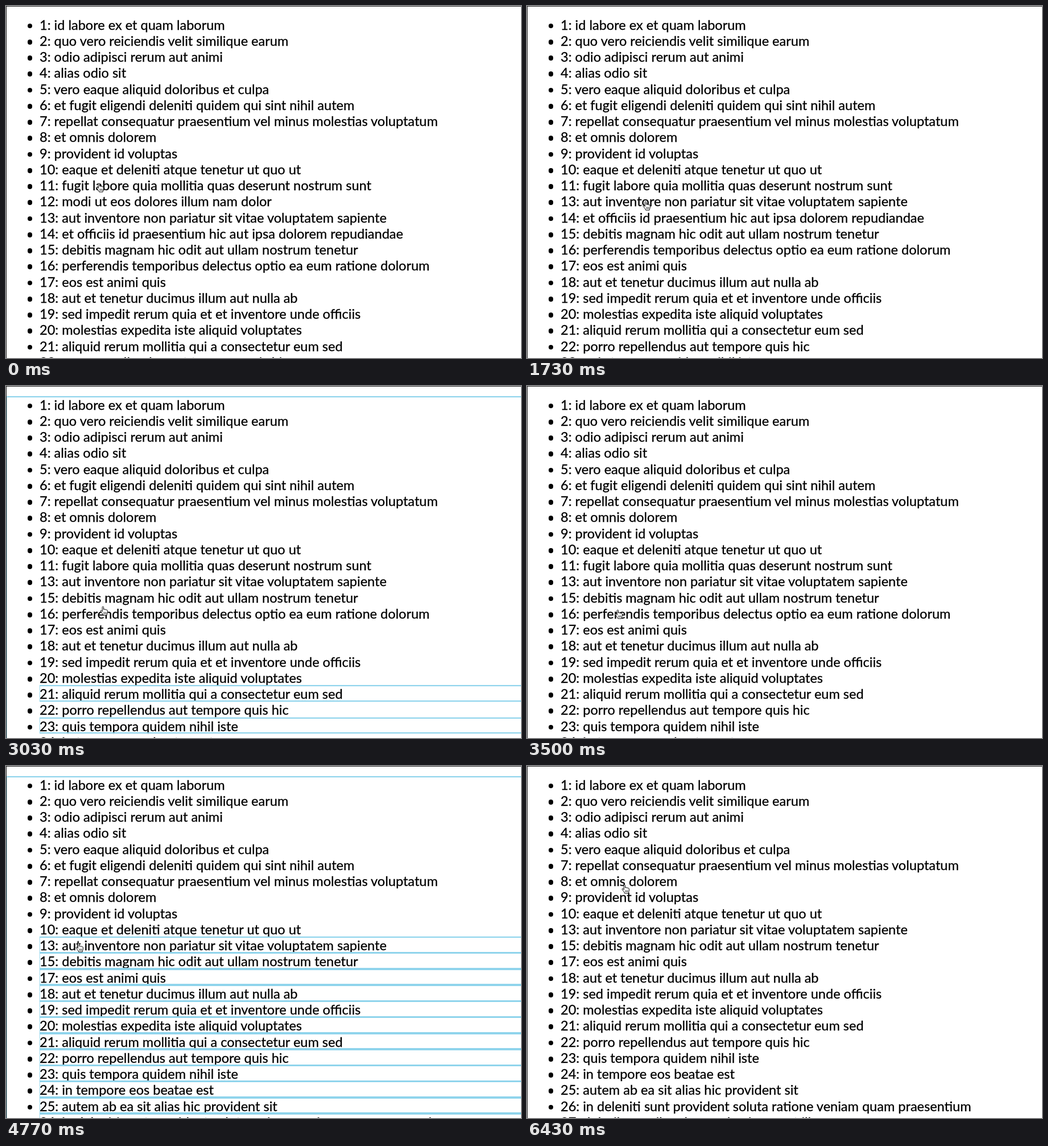
Recreate the animation shown at these times as an HTML page. Size 905x619 px, loop 8170 ms.

```html
<!DOCTYPE html>
<html lang="la">
<head>
<meta charset="utf-8">
<title>List</title>
<style>
  html, body { margin: 0; width: 100%; height: 100%; overflow: hidden; background: #fff; }
  #stage { position: relative; width: 905px; height: 619px; overflow: hidden; }
  #stage::after {
    content: ""; position: absolute; inset: 0;
    border: solid #1c1c1c; border-width: 1px 0 0 1px;
  }
  ul {
    position: absolute; left: 1px; top: 18.5px; width: 930px;
    margin: 0; padding: 0 0 0 58px; box-sizing: border-box; list-style: none;
    font: 400 23.54px/28.25px Lato, sans-serif; color: #000;
    -webkit-text-stroke: .3px #000;
  }
  li { position: relative; height: 28.25px; white-space: nowrap; }
  li::before {
    content: ""; position: absolute; left: -21.5px; top: 12.2px;
    width: 8.6px; height: 8.6px; border-radius: 50%; background: #000;
  }
  .lit::after {
    content: ""; position: absolute; inset: -.8px 0 .4px 0;
    border: 2px solid #8fd4ec; border-left: 1.5px solid #abdff1;
    box-shadow: 0 0 1px #8fd4ec;
  }
  li[hidden] { display: none; }
  #hand { position: absolute; left: 0; top: 0; width: 15px; height: 17px; }
</style>
</head>
<body>
<div id="stage">
  <ul id="list"></ul>
  <svg id="hand" viewBox="0 0 15 17">
    <path d="M4.2 9.6V2.2c0-2 2.4-2 2.4 0v4c.3-1.2 2.2-1 2.3.3.5-1 2.2-.7 2.3.6.7-.8 2.2-.4 2.2 1v3c0 1.600-1.200 2.400-1.200 4.900H5.700c0-1.500-1.600-2.700-2.500-4.300L1.300 9.200c-.8-1.400.9-2.300 1.800-1z"
      fill="#fff" stroke="#000" stroke-width="1" stroke-linejoin="round"/>
    <path d="M7 10.500v3.500M9 10.500v3.500M11 10.500v3.500" stroke="#000" stroke-width=".8"/>
  </svg>
</div>
<script>
  const LOOP = 8170;
  const titles = [
    'id labore ex et quam laborum',
    'quo vero reiciendis velit similique earum',
    'odio adipisci rerum aut animi',
    'alias odio sit',
    'vero eaque aliquid doloribus et culpa',
    'et fugit eligendi deleniti quidem qui sint nihil autem',
    'repellat consequatur praesentium vel minus molestias voluptatum',
    'et omnis dolorem',
    'provident id voluptas',
    'eaque et deleniti atque tenetur ut quo ut',
    'fugit labore quia mollitia quas deserunt nostrum sunt',
    'modi ut eos dolores illum nam dolor',
    'aut inventore non pariatur sit vitae voluptatem sapiente',
    'et officiis id praesentium hic aut ipsa dolorem repudiandae',
    'debitis magnam hic odit aut ullam nostrum tenetur',
    'perferendis temporibus delectus optio ea eum ratione dolorum',
    'eos est animi quis',
    'aut et tenetur ducimus illum aut nulla ab',
    'sed impedit rerum quia et et inventore unde officiis',
    'molestias expedita iste aliquid voluptates',
    'aliquid rerum mollitia qui a consectetur eum sed',
    'porro repellendus aut tempore quis hic',
    'quis tempora quidem nihil iste',
    'in tempore eos beatae est',
    'autem ab ea sit alias hic provident sit',
    'in deleniti sunt provident soluta ratione veniam quam praesentium',
    'doloribus quibusdam molestiae amet illum'
  ];

  // Each click removes one item and outlines the rows after it until `end`;
  // from `thin` on only the rows in `keep` stay outlined.
  const clicks = [
    { id: 12, at: 1500, end: 1700 },
    { id: 14, at: 2870, thin: 3000, keep: [21, 23], end: 3080 },
    { id: 16, at: 3800, end: 4120 },
    { id: 11, at: 4770, end: 5090 },
    { id: 6, at: 6100, end: 6430 }
  ];

  // Pointer stops: time, x, y
  const path = [
    [0, 158, 311], [270, 158, 311], [800, 205, 339], [1500, 205, 339],
    [1730, 203, 343], [2300, 172, 367], [2870, 172, 367], [3030, 165, 387],
    [3500, 154, 393], [3800, 154, 393], [4000, 128, 342], [4270, 122, 311],
    [4770, 122, 311], [5100, 123, 149], [5400, 123, 149], [5630, 125, 173],
    [6100, 125, 173], [6230, 166, 208], [LOOP, 166, 208]
  ];

  const list = document.getElementById('list');
  const hand = document.getElementById('hand');
  const rows = titles.map((title, i) => {
    const li = document.createElement('li');
    li.textContent = `${i + 1}: ${title}`;
    return list.appendChild(li);
  });

  const ease = k => k * k * (3 - 2 * k);

  function pointerAt(t) {
    const i = path.findIndex(p => p[0] > t);
    const [t0, x0, y0] = path[i - 1], [t1, x1, y1] = path[i];
    const k = ease((t - t0) / (t1 - t0));
    return [x0 + (x1 - x0) * k, y0 + (y1 - y0) * k];
  }

  function draw(t) {
    const gone = clicks.filter(c => t >= c.at);
    const active = gone.find(c => t < c.end);
    const lit = id => !!active && id > active.id &&
      (!active.keep || t < active.thin || active.keep.includes(id));

    list.classList.toggle('lit', !!active);
    rows.forEach((li, i) => {
      li.hidden = gone.some(c => c.id === i + 1);
      li.classList.toggle('lit', lit(i + 1));
    });
    const [x, y] = pointerAt(t);
    hand.style.transform = `translate(${x}px, ${y}px)`;
  }

  const start = performance.now();
  function tick() {
    draw((performance.now() - start) % LOOP);
    requestAnimationFrame(tick);
  }
  tick();
</script>
</body>
</html>
```
